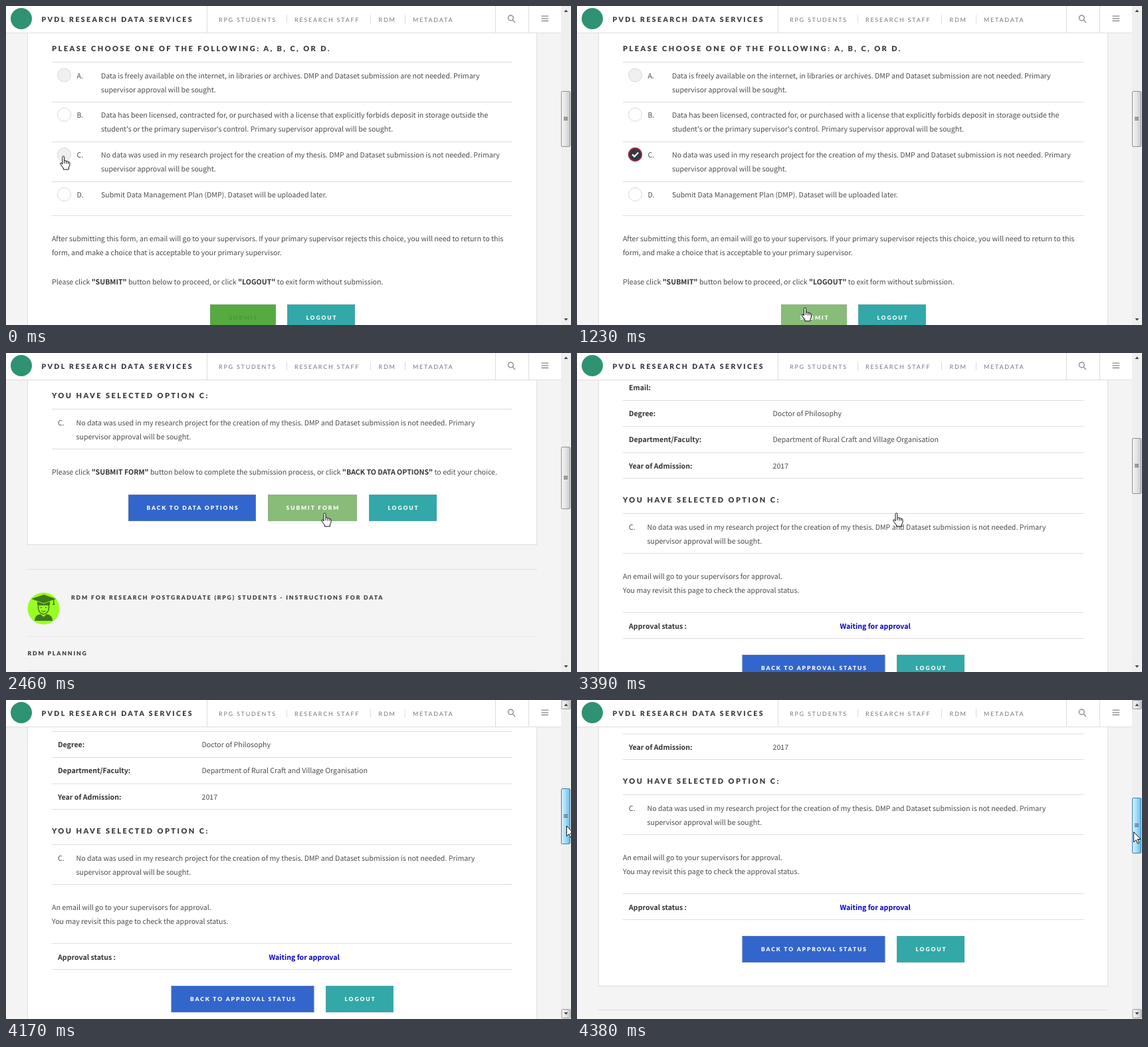
Animation, 850 px wide and 480 px high, one loop 4.83 s. Source, as an HTML page:

```html
<!DOCTYPE html>
<html lang="en">
<head>
<meta charset="utf-8">
<style>
html, body { margin: 0; width: 850px; height: 480px; overflow: hidden; background: #f4f4f4; }
svg { display: block; }
text { font: 10.61px "Noto Sans CJK SC", "Noto Sans CJK JP", "Open Sans", sans-serif; fill: #4c4c4c; text-rendering: geometricPrecision; white-space: pre; }
.b, tspan { font-weight: 700; fill: #333; }
.wait { font-weight: 700; fill: #0000c8; }
.h, .brand, .sub, .nav, .btn { font-family: Lato, sans-serif; font-weight: 900; fill: #3c3b3b; }
.h { font-size: 11px; letter-spacing: 2.45px; }
.brand { font-size: 10.5px; letter-spacing: 2.4px; }
.sub { font-size: 8.7px; letter-spacing: 1.83px; }
.nav { font-size: 9px; letter-spacing: 1.76px; font-weight: 400; fill: #777; }
.btn { font-size: 8.5px; letter-spacing: 1.9px; fill: #fff; text-anchor: middle; }
</style>
</head>
<body>
<svg id="stage" width="850" height="480" viewBox="0 0 850 480"></svg>
<script>
const LOOP = 4830;
const GREEN = '#55aa40', TEAL = '#32a8a8', BLUE = '#3366cc';

const text = (x, y, s, cls = '') => `<text x="${x}" y="${y}" class="${cls}">${s}</text>`;
const rect = (x, y, w, h, fill, more = '') =>
  `<rect x="${x}" y="${y}" width="${w}" height="${h}" fill="${fill}" ${more}/>`;
const path = (d, more = '') => `<path d="${d}" fill="none" stroke="#ddd" ${more}/>`;
const rules = (...ys) => path(ys.map(y => `M69 ${y}H762`).join(''));
const panel = h => rect(32.5, -20.5, 766, h + 20.5, '#fff', 'stroke="#ddd"');
const button = (x, y, w, fill, label, id = '') =>
  rect(x, y, w, 40, fill) +
  (id && rect(x, y, w, 40, '#88bc78', `id="${id}Hover" opacity="0"`)) +
  rect(x + .5, y + .5, w - 1, 39, 'none', 'stroke="#a0a0a0" stroke-opacity=".3"') +
  `<text id="${id}Label" class="btn" x="${x + w / 2 + 1}" y="${y + 23}">${label}</text>`;
const radio = (y, fill) => `<circle cx="87.5" cy="${y}" r="10" fill="${fill}" stroke="#d8d8d8"/>`;

const NO_DATA = ['No data was used in my research project for the creation of my thesis. DMP and Dataset submission is not needed. Primary',
  'supervisor approval will be sought.'];
const options = [
  ['A', 104, '#f0f0f0', 'Data is freely available on the internet, in libraries or archives. DMP and Dataset submission are not needed. Primary',
    'supervisor approval will be sought.'],
  ['B', 163.5, '#fff', 'Data has been licensed, contracted for, or purchased with a license that explicitly forbids deposit in storage outside the',
    "student's or the primary supervisor's control. Primary supervisor approval will be sought."],
  ['C', 223.5, '#f0f0f0', ...NO_DATA],
  ['D', 283.5, '#fff', 'Submit Data Management Plan (DMP). Dataset will be uploaded later.', '']
];
const chosen = y => text(69, y, 'YOU HAVE SELECTED OPTION C:', 'h') + rules(y + 16.5, y + 76.5) +
  text(78, y + 41, 'C.') + text(105.5, y + 41, NO_DATA[0]) + text(105.5, y + 61.5, NO_DATA[1]);

const choosePage = panel(520) +
  text(69, 68, 'PLEASE CHOOSE ONE OF THE FOLLOWING: A, B, C, OR D.', 'h') +
  rules(84.5, 144.5, 204.5, 264.5, 315.5) +
  options.map(([key, y, fill, a, b]) => radio(y, fill) + text(106.5, y + 4.7, key + '.') +
    text(143, y + 4.7, a) + text(143, y + 25.5, b)).join('') +
  `<g id="check" opacity="0"><circle cx="87.5" cy="223.5" r="10" fill="#363840" stroke="#b8305a" stroke-width="1.3"/>` +
  path('M83.2 223.3l3.2 3.2l5.8-6', 'style="stroke:#fff;stroke-width:2.4"') + '</g>' +
  text(69, 353.5, 'After submitting this form, an email will go to your supervisors. If your primary supervisor rejects this choice, you will need to return to this') +
  text(69, 374.5, 'form, and make a choice that is acceptable to your primary supervisor.') +
  text(69, 419, 'Please click <tspan>"SUBMIT"</tspan> button below to proceed, or click <tspan>"LOGOUT"</tspan> to exit form without submission.') +
  button(307, 449, 99, GREEN, 'SUBMIT', 'submit') + button(423, 449, 102, TEAL, 'LOGOUT');

const graduate = '<circle cx="56.5" cy="384.5" r="24" fill="#99ff22"/>' +
  '<g fill="#3d7a18"><path d="M38 370L57 363.5L75 370L57 376.5ZM47 374v5h19v-5l-9 3.5Z"/>' +
  '<path d="M43 403q0-9 9-10l4.5 4l4.5-4q9 1 9 10Z"/><path d="M71 370h1.5v6l1 3h-3.5l1-3Z"/></g>' +
  '<path d="M48.5 379h16v5q-1 8-8 9q-7-1-8-9Z" fill="#99ff22" stroke="#3d7a18" stroke-width="1.5"/>' +
  '<path d="M52 383h2m5 0h2m-7.5 5q3 2 6 0" fill="none" stroke="#3d7a18" stroke-width="1.5"/>';

const confirmPage = panel(288.5) + chosen(68) +
  text(69, 183, 'Please click <tspan>"SUBMIT FORM"</tspan> button below to complete the submission process, or click <tspan>"BACK TO DATA OPTIONS"</tspan> to edit your choice.') +
  button(184, 213, 192, BLUE, 'BACK TO DATA OPTIONS') +
  button(394, 213, 134, GREEN, 'SUBMIT FORM', 'form') +
  button(546, 213, 102, TEAL, 'LOGOUT') +
  path('M32 325.5H799') + graduate +
  text(98, 371.3, 'RDM FOR RESEARCH POSTGRADUATE (RPG) STUDENTS - INSTRUCTIONS FOR DATA', 'sub') +
  path('M32 426.5H799M32 477.5H799', 'stroke-dasharray="1 1"') +
  text(32.5, 455.2, 'RDM PLANNING', 'sub');

const details = [['Email:', 56.3, ''], ['Degree:', 95.3, 'Doctor of Philosophy'],
  ['Department/Faculty:', 134.3, 'Department of Rural Craft and Village Organisation'],
  ['Year of Admission:', 173.8, '2017']];
const statusPage = panel(529.5) +
  details.map(([k, y, v]) => text(78, y, k, 'b') + text(294.5, y, v)).join('') +
  rules(71.5, 110.5, 150, 188.5, 390.5, 429.5) + chosen(225) +
  text(69, 340, 'An email will go to your supervisors for approval.') +
  text(69, 360.5, 'You may revisit this page to check the approval status.') +
  text(78, 414.5, 'Approval status :', 'b') + text(395.5, 414.5, 'Waiting for approval', 'wait') +
  button(248.5, 454, 215, BLUE, 'BACK TO APPROVAL STATUS') + button(481, 454, 102, TEAL, 'LOGOUT') +
  path('M32 565.5H799');

const header = rect(0, 0, 835, 40, '#fff') +
  path('M0 40.5H835M302.5 0V40M736.5 0V40M786.5 0V40M422.5 13.5V26M548.5 13.5V26M600.5 13.5V26') +
  '<circle cx="23" cy="19" r="16" fill="#2f9273"/>' +
  text(53.5, 24, 'PVDL RESEARCH DATA SERVICES', 'brand') +
  text(320, 24, 'RPG STUDENTS', 'nav') + text(434, 24, 'RESEARCH STAFF', 'nav') +
  text(560.5, 24, 'RDM', 'nav') + text(612, 24, 'METADATA', 'nav') +
  '<g fill="none" stroke="#999" stroke-width="1.6"><circle cx="759.3" cy="18" r="3.9"/>' +
  '<path d="M762 21l4 4M805.5 15.2h10.5M805.5 18.8h10.5M805.5 22.4h10.5"/></g>';

const shade = (id, a, b, c) => `<linearGradient id="${id}"><stop stop-color="${a}"/>` +
  `<stop offset=".5" stop-color="${b}"/><stop offset="1" stop-color="${c}"/></linearGradient>`;
const scrollbar = `<defs>${shade('grey', '#f5f5f5', '#e4e4e6', '#c8c8cc')}${shade('blue', '#d9f1fc', '#a5dcf6', '#62b8e4')}</defs>` +
  rect(835, 0, 15, 480, '#efefef') +
  `<g id="ends">${rect(836, .5, 13, 13, 'url(#grey)', 'stroke="#999" rx="1.5"')}${rect(836, 465.5, 13, 13, 'url(#grey)', 'stroke="#999" rx="1.5"')}</g>` +
  '<path d="M839.5 9l3-3.5l3 3.5ZM839.5 470l3 3.5l3-3.5Z" fill="#444"/>' +
  rect(835.5, 129, 13, 83, 'url(#grey)', 'id="thumb" stroke="#8e8f92" rx="1.5"') +
  '<path id="grip" d="M839 -2h6M839 0h6M839 2h6" stroke="#555"/>';

const cursors = '<g id="cursor" fill="#fff" stroke="#111" stroke-linejoin="round">' +
  '<path id="arrow" d="M.5 .5V16L4 12.5L6.5 18L8.8 17L6.3 11.5H11Z"/>' +
  '<path id="hand" d="M-1.5 12V1.5a1.5 1.5 0 0 1 3 0V7q1.5-1 3 .5q1.5-.5 2.7 .8q2-.2 2.3 1.7v4l-1.5 3v3h-8v-2l-4.5-6q-.5-2.5 1.5-2zM1.5 7v4M4.5 7.5v4M7.2 8.5v3"/></g>';

document.getElementById('stage').innerHTML =
  [choosePage, confirmPage, statusPage].map((s, i) => `<g id="page${i}">${s}</g>`).join('') +
  header + scrollbar + cursors;

const set = (id, name, value) => document.getElementById(id).setAttribute(name, value);
const show = (id, on) => set(id, 'display', on ? 'inline' : 'none');
const ramp = (t, from, to) => Math.min(1, Math.max(0, (t - from) / (to - from)));

// Linear interpolation through [time, value, ...] keys.
function along(keys, t, k = 1) {
  const i = keys.findIndex(key => key[0] > t);
  if (i < 0) return keys[keys.length - 1][k];
  if (!i) return keys[0][k];
  const a = keys[i - 1], b = keys[i];
  return a[k] + (b[k] - a[k]) * ramp(t, a[0], b[0]);
}

const pointer = [[560, 86.3, 226], [600, 110, 242], [750, 336, 432], [810, 343, 454],
  [2060, 343, 454], [2130, 368, 412], [2250, 456, 262], [2340, 479.5, 241],
  [3390, 479.5, 241], [3450, 540, 231], [3570, 790, 191], [3650, 843, 179],
  [3840, 843, 179], [4170, 843, 189], [4350, 837, 198]];
const scrolling = [[3960, 0], [4080, 8], [4170, 24], [4350, 99]];

function draw() {
  const t = performance.now() % LOOP;
  const page = t < 1500 ? 0 : t < 3390 ? 1 : 2;
  for (let i = 0; i < 3; i++) show('page' + i, i === page);

  const picked = ramp(t, 60, 210);
  set('check', 'opacity', picked);
  set('submitLabel', 'style', `fill:${picked ? '#fff' : '#3f8a38'};opacity:${picked || .5}`);
  set('submitHover', 'opacity', ramp(t, 770, 930));
  set('formHover', 'opacity', ramp(t, 2260, 2460));

  const scroll = Math.round(along(scrolling, t));
  set('page2', 'transform', `translate(0 ${-scroll})`);
  const top = page === 1 ? 142 : 129 + Math.round(scroll * .19);
  const size = page === 1 ? 93 : 83;
  const hot = t >= 3600;
  set('thumb', 'y', top - .5);
  set('thumb', 'height', size);
  set('thumb', 'fill', hot ? 'url(#blue)' : 'url(#grey)');
  set('thumb', 'stroke', hot ? '#3c7fb1' : '#8e8f92');
  set('grip', 'transform', `translate(0 ${top + Math.floor(size / 2) - .5})`);
  show('ends', hot);

  const hand = t < 600 || t >= 790 && t < 1500 || t >= 2270 && t < 3420;
  show('hand', hand);
  show('arrow', !hand);
  set('cursor', 'transform', `translate(${along(pointer, t)} ${along(pointer, t, 2)})`);
  requestAnimationFrame(draw);
}
draw();
</script>
</body>
</html>
```
